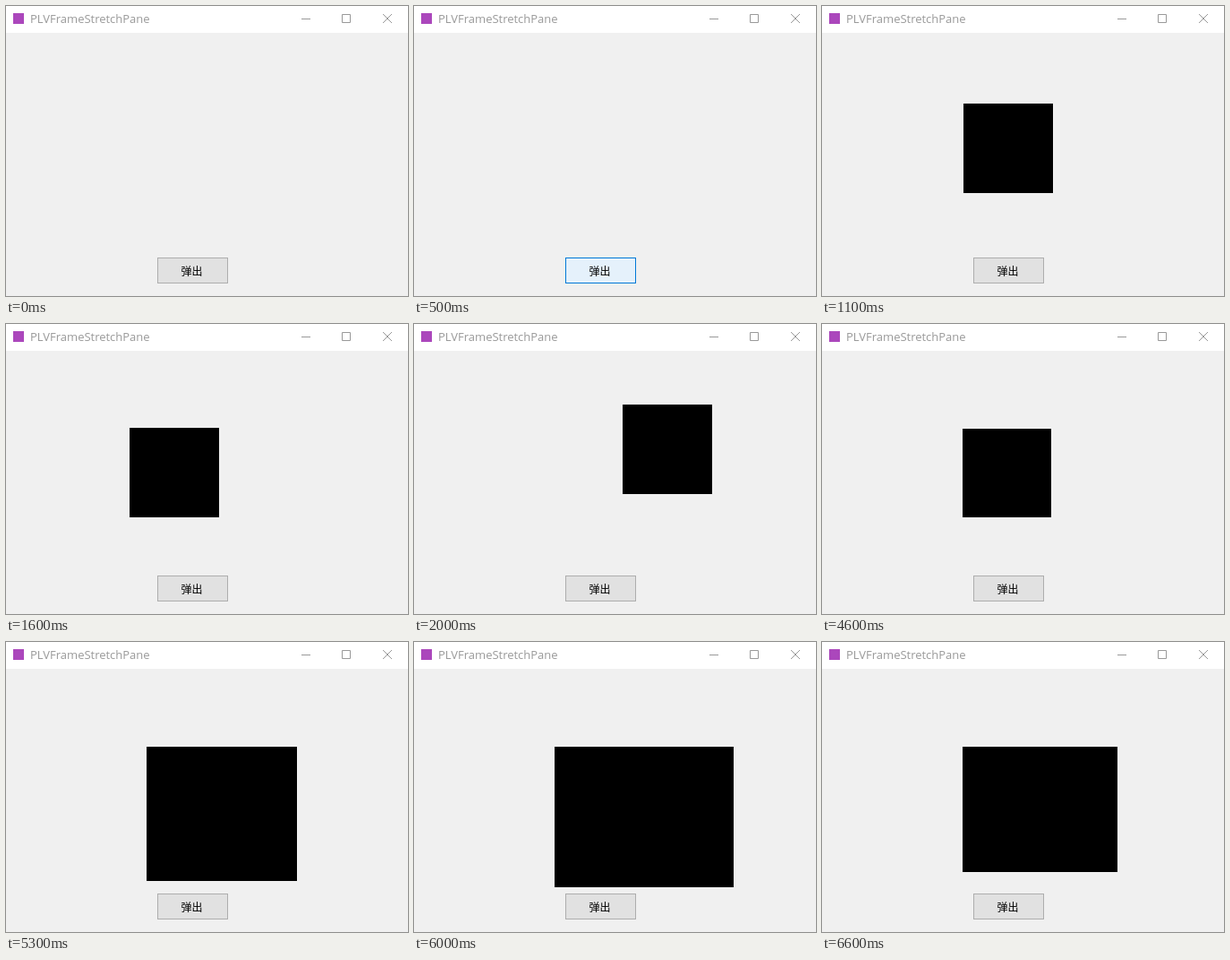
An HTML page with a canvas that plays this animation: 449x324 px, repeating every 7000 ms.

```html
<!DOCTYPE html>
<html lang="zh">
<head>
<meta charset="utf-8">
<style>
html, body { margin: 0; width: 100%; height: 100%; overflow: hidden; background: #f0f0f0; }
canvas { display: block; }
</style>
</head>
<body>
<canvas id="stage" width="449" height="324"></canvas>
<script>
const ctx = document.getElementById('stage').getContext('2d');
const LOOP = 7000;
const STEP = 100;
const POPUP_AT = 800;

const BUTTON = {
  normal: { border: '#adadad', fill: '#e1e1e1' },
  hover: { border: '#0078d7', fill: '#e5f1fb' },
  pressed: { border: '#005499', fill: '#cce4f7' }
};

// Turning points of the pointer gestures.
const positions = [
  { at: 1100, value: [158, 109] },
  { at: 1300, value: [232, 56] },
  { at: 1700, value: [121, 127] },
  { at: 1800, value: [130, 123] },
  { at: 2100, value: [269, 78] },
  { at: 2400, value: [157, 117] }
];
const sizes = [
  { at: 4500, value: [100, 100] },
  { at: 4600, value: [99, 99] },
  { at: 5000, value: [200, 188] },
  { at: 5700, value: [118, 91] },
  { at: 6000, value: [200, 157] },
  { at: 6200, value: [150, 123] },
  { at: 6600, value: [173, 140] }
];

const smooth = u => u * u * (3 - 2 * u);

function glide(keys, time) {
  const next = keys.findIndex(key => key.at > time);
  if (next === 0) return keys[0].value;
  if (next < 0) return keys[keys.length - 1].value;
  const from = keys[next - 1], to = keys[next];
  const u = smooth((time - from.at) / (to.at - from.at));
  return from.value.map((v, i) => Math.round(v + (to.value[i] - v) * u));
}

function fillRect(color, x, y, w, h) {
  ctx.fillStyle = color;
  ctx.fillRect(x, y, w, h);
}

function text(label, font, color, x, y, align) {
  ctx.font = font;
  ctx.fillStyle = color;
  ctx.textAlign = align;
  ctx.fillText(label, x, y);
}

function drawTitleBar(active) {
  const color = active ? '#000' : '#999';
  fillRect('#fff', 0, 0, 449, 30);
  fillRect('#ab47bc', 8, 8, 12, 12);
  text('PLVFrameStretchPane', '13px "Open Sans", sans-serif', color, 27, 19, 'left');

  ctx.strokeStyle = color;
  ctx.lineWidth = 1;
  ctx.beginPath();
  ctx.moveTo(330, 14.5);
  ctx.lineTo(340, 14.5);
  ctx.rect(375.5, 9.5, 9, 9);
  ctx.moveTo(421, 9);
  ctx.lineTo(431, 19);
  ctx.moveTo(431, 9);
  ctx.lineTo(421, 19);
  ctx.stroke();
}

function drawButton({ border, fill }) {
  fillRect(border, 169, 281, 79, 29);
  fillRect(fill, 170, 282, 77, 27);
  text('弹出', '12px "Noto Sans CJK SC", "Noto Sans CJK", sans-serif', '#000', 207.5, 301, 'center');
}

function draw(time) {
  const active = time >= 600 && time < POPUP_AT;
  const hovered = time >= 400 && time < 600;
  fillRect('#f0f0f0', 0, 0, 449, 324);
  drawTitleBar(active);
  drawButton(active ? BUTTON.pressed : hovered ? BUTTON.hover : BUTTON.normal);
  if (time >= POPUP_AT) {
    fillRect('#000', ...glide(positions, time), ...glide(sizes, time));
  }
}

const origin = performance.now();
function tick() {
  const time = (performance.now() - origin) % LOOP;
  draw(Math.floor(time / STEP) * STEP);
  requestAnimationFrame(tick);
}
tick();
</script>
</body>
</html>
```
